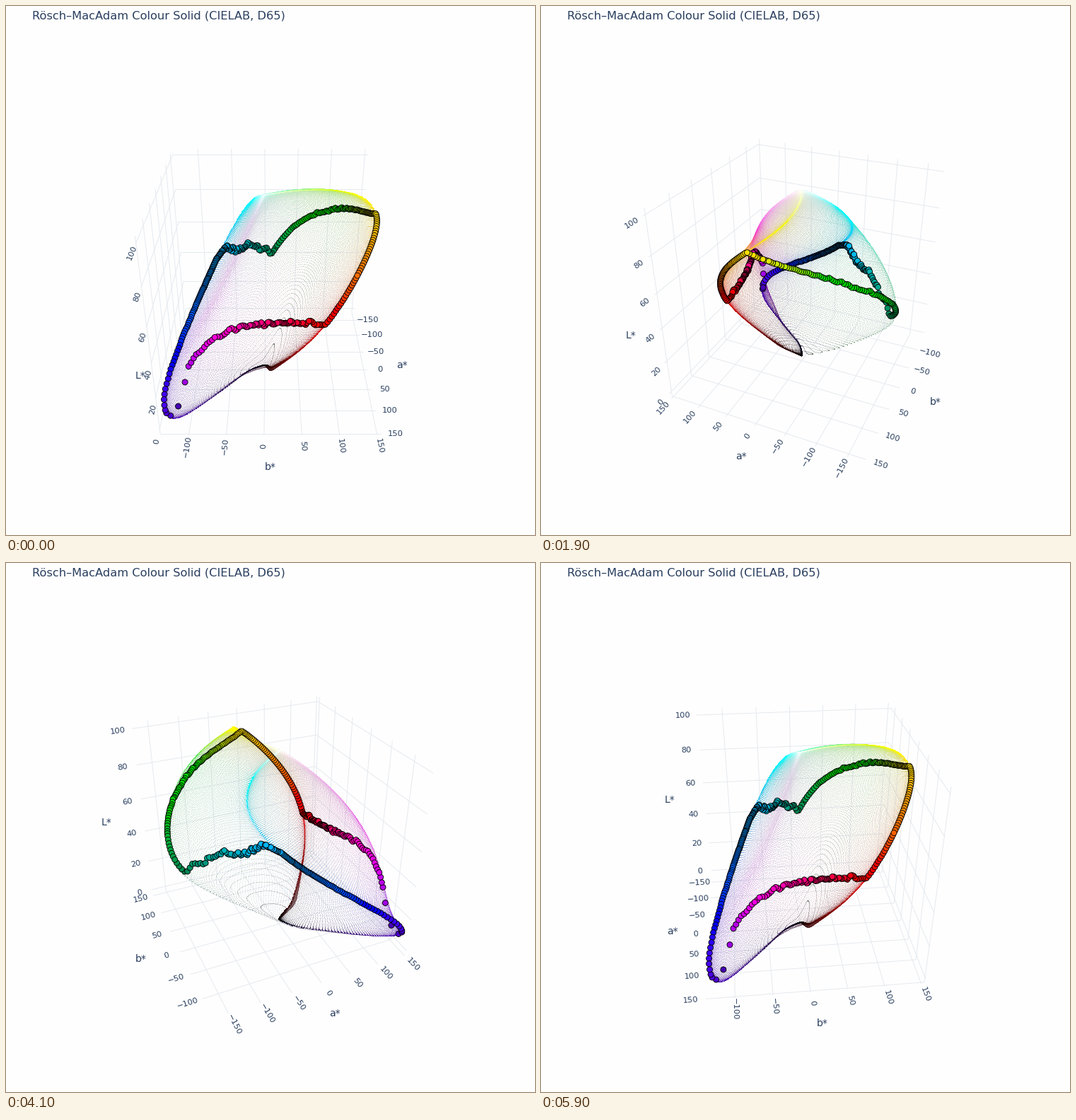
Write a matplotlib script that moves like this. It is 748 by 748 pixels and loops after 6000 ms.

```python
import numpy as np
import matplotlib.pyplot as plt
from matplotlib.animation import FuncAnimation
from matplotlib.collections import LineCollection

SIZE, FRAMES = 748, 60
PT = 0.72                                  # points per pixel at 100 dpi
CX, CY, FOCAL = 374, 392.5, 857
EYE_R, EYE_Z = 2.5, 1.5
INK, GRID = "#2a3f5f", "#e6eaef"
LOW = np.array([-175.5, -138, -3.125])     # axis ranges of a*, b*, L*
HIGH = np.array([152.5, 155, 103.125])
TICKS = [np.arange(-150, 151, 50), np.arange(-100, 151, 50), np.arange(0, 101, 20)]
TICK_PAD, NAME_PAD = 0.068, 0.187


def lobe(wave, height, centre, left, right):
    width = np.where(wave < centre, left, right)
    return height * np.exp(-0.5 * ((wave - centre) / width) ** 2)


def observer(wave):
    """Gaussian fit of the CIE 1931 colour matching functions."""
    x = (lobe(wave, 1.056, 599.8, 37.9, 31.0) + lobe(wave, 0.362, 442.0, 16.0, 26.7)
         + lobe(wave, -0.065, 501.1, 20.4, 26.2))
    y = lobe(wave, 0.821, 568.8, 46.9, 40.5) + lobe(wave, 0.286, 530.9, 16.3, 31.1)
    z = lobe(wave, 1.217, 437.0, 11.8, 36.0) + lobe(wave, 0.681, 459.0, 26.0, 13.8)
    return np.stack([x, y, z], 1)


def daylight(wave):
    return np.interp(wave, [380, 400, 430, 460, 560, 600, 780],
                     [50, 84, 92, 117, 100, 90, 62])


def optimal_colours():
    """XYZ of every band-pass and band-stop reflectance, and the white point."""
    wave = np.arange(380, 781)
    power = observer(wave) * daylight(wave)[:, None]
    total = np.vstack([np.zeros(3), np.cumsum(power, 0)])
    total /= total[-1, 1]
    start, stop = np.triu_indices(len(total), 1)
    band = total[stop] - total[start]
    return np.clip(np.vstack([band, total[-1] - band]), 0, None), total[-1]


def to_lab(xyz, white):
    t = xyz / white
    f = np.where(t > 0.008856, np.cbrt(t), 7.787 * t + 16 / 116)
    return np.stack([500 * (f[:, 0] - f[:, 1]), 200 * (f[:, 1] - f[:, 2]),
                     116 * f[:, 1] - 16], 1)


def to_rgb(xyz):
    m = np.array([[3.2406, -1.5372, -0.4986], [-0.9689, 1.8758, 0.0415],
                  [0.0557, -0.2040, 1.0570]])
    v = np.clip(xyz @ m.T, 0, 1)
    return np.where(v <= 0.0031308, 12.92 * v, 1.055 * v ** (1 / 2.4) - 0.055)


def to_box(points):
    return (points - LOW) / (HIGH - LOW) - 0.5


def strongest_per_hue(lab):
    """Index of the most chromatic colour in each degree of hue."""
    hue = np.floor(np.degrees(np.arctan2(lab[:, 1], lab[:, 0])) % 360).astype(int)
    chroma = np.hypot(lab[:, 0], lab[:, 1])
    order = np.lexsort((chroma, hue))
    last = np.append(np.diff(hue[order]) > 0, True)
    return order[last]


def soften(loop):
    return (np.roll(loop, 1, 0) + 2 * loop + np.roll(loop, -1, 0)) / 4


def project(points, theta):
    p = np.atleast_2d(points)
    c, s = np.cos(theta), np.sin(theta)
    dist = np.hypot(EYE_R, EYE_Z)
    ce, se = EYE_R / dist, EYE_Z / dist
    side = p[:, 1] * c - p[:, 0] * s
    toward = p[:, 0] * c + p[:, 1] * s
    depth = dist - ce * toward - se * p[:, 2]
    scale = FOCAL / depth
    return np.stack([CX + scale * side, CY - scale * (ce * p[:, 2] - se * toward)], 1), depth


def splat(xy, rgb):
    """Translucent one-pixel dots: grey where sparse, coloured where they pile up."""
    col, row = xy.astype(int).T
    cell = row * SIZE + col
    count = np.bincount(cell, minlength=SIZE * SIZE)
    used = np.flatnonzero(count)
    n = count[used]
    tint = np.stack([np.bincount(cell, c, SIZE * SIZE)[used] / n for c in rgb.T], 1)
    strength = (1 - 0.82 ** n)[:, None]
    image = np.zeros((SIZE * SIZE, 4), np.uint8)
    image[used, :3] = 255 * (0.62 + (tint - 0.62) * (0.25 + 0.75 * strength))
    image[used, 3] = 255 * (1 - 0.76 ** n)
    return image.reshape(SIZE, SIZE, 4)


xyz, white = optimal_colours()
lab = to_lab(xyz, white)
cloud, cloud_rgb = to_box(lab), to_rgb(xyz)
cusp = strongest_per_hue(lab)
ring, ring_rgb = soften(cloud[cusp]), cloud_rgb[cusp]
tick_pos = [(t - LOW[i]) / (HIGH[i] - LOW[i]) - 0.5 for i, t in enumerate(TICKS)]

fig = plt.figure(figsize=(SIZE / 100, SIZE / 100), dpi=100, facecolor="#fefefe")
ax = fig.add_axes([0, 0, 1, 1])
ax.axis("off")
grid = ax.add_collection(LineCollection([], colors=GRID, linewidths=1 * PT, zorder=1))
dots = ax.imshow(np.zeros((SIZE, SIZE, 4), np.uint8), extent=(0, SIZE, SIZE, 0),
                 interpolation="nearest", aspect="auto", zorder=2)
beads = ax.scatter(ring[:, 0], ring[:, 1], s=(8 * PT) ** 2, edgecolors="black",
                   linewidths=0.9 * PT, zorder=3)
ax.set_xlim(0, SIZE)
ax.set_ylim(SIZE, 0)


def label(text, size):
    return ax.text(0, 0, text, fontsize=size * PT, color=INK, family="DejaVu Sans",
                   ha="center", va="center", zorder=4)


labels = [[label(str(t).replace("-", "\u2212"), 11.5) for t in ticks] for ticks in TICKS]
names = [label(n, 14) for n in ("a*", "b*", "L*")]
ax.text(37.5, 18.5, "Rösch–MacAdam Colour Solid (CIELAB, D65)", fontsize=16.3 * PT,
        color=INK, family="DejaVu Sans", va="baseline")


def with_axis(corner, axis, value):
    p = np.array(corner, float)
    p[axis] = value
    return p


def grid_lines(back):
    """Each tick is ruled across the two far planes that contain its axis."""
    lines = []
    for axis in range(3):
        for other in {0, 1, 2} - {axis}:
            for value in tick_pos[axis]:
                p = with_axis(back, axis, value)
                lines.append([with_axis(p, other, -0.5), with_axis(p, other, 0.5)])
    return np.array(lines)


def place_axis(axis, corner, outward, theta):
    for text, value in zip(labels[axis], tick_pos[axis]):
        p = with_axis(corner, axis, value)
        xy, _ = project([p, p + outward * TICK_PAD], theta)
        dx, dy = xy[1] - xy[0]
        angle = np.degrees(np.arctan2(-dy, dx))
        text.set_position(xy[1])
        text.set_rotation((angle + 90) % 180 - 90)
    middle = with_axis(corner, axis, 0) + outward * NAME_PAD
    names[axis].set_position(project(middle, theta)[0][0])


def draw(i):
    theta = 2 * np.pi * i / FRAMES
    quarter = (i * 4 // FRAMES) * np.pi / 2 + np.pi / 4
    near = 0.5 * np.sign([np.cos(quarter), np.sin(quarter)])
    back = np.array([-near[0], -near[1], -0.5])

    lines = grid_lines(back)
    grid.set_segments(project(lines.reshape(-1, 3), theta)[0].reshape(-1, 2, 2))

    dots.set_data(splat(project(cloud, theta)[0], cloud_rgb))
    xy, depth = project(ring, theta)
    order = np.argsort(-depth)
    beads.set_offsets(xy[order])
    beads.set_facecolors(ring_rgb[order])

    front = np.array([near[0], near[1], -0.5])
    place_axis(0, front, np.array([0, 2 * near[1], 0]), theta)
    place_axis(1, front, np.array([2 * near[0], 0, 0]), theta)
    sides = np.array([[near[0], -near[1], -0.5], [-near[0], near[1], -0.5]])
    left = sides[np.argmin(project(sides, theta)[0][:, 0])]
    place_axis(2, left, left - back, theta)
    return [grid, dots, beads]


anim = FuncAnimation(fig, draw, frames=FRAMES, interval=100, repeat=True)
plt.show()
```
